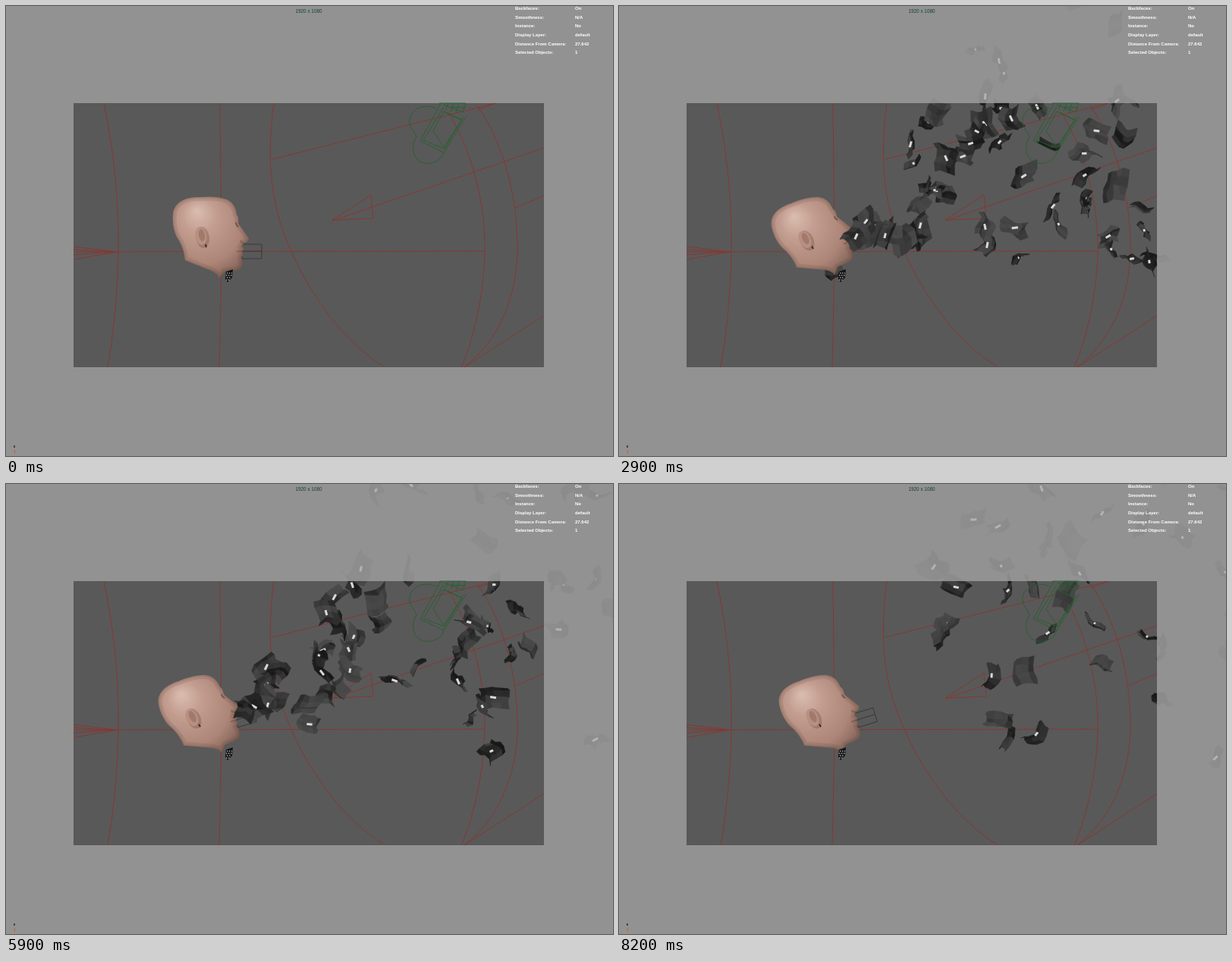
Write an HTML page with a canvas that moves like this. It is 800x593 px and loops after 8.3 s.

```html
<!DOCTYPE html>
<html lang="en">
<head>
<meta charset="utf-8">
<title>Head emitter playblast</title>
<style>
  html, body { margin: 0; width: 100%; height: 100%; overflow: hidden; background: #929292; }
  svg, canvas { position: absolute; left: 0; top: 0; width: 800px; height: 593px; }
  .wire { fill: none; stroke-width: .8; }
  text { font-family: "Liberation Sans", Arial, sans-serif; }
  .hud { font-size: 6px; font-weight: bold; fill: #fff; }
</style>
</head>
<body>
<svg viewBox="0 0 800 593">
  <rect x="89" y="128" width="620" height="348" fill="#595959"/>
  <g class="wire" stroke="#913029">
    <path d="M89 324L631 323M129 128C142 190 149 255 148 323C147 380 142 430 134 476"/>
    <path d="M282 128Q283 220 284 323Q283 400 281 476"/>
    <path d="M353 128C342 210 351 270 376 323C400 380 448 446 500 476"/>
    <path d="M351 202L645 128M430 283L709 187M430 282L481 249L484 280Z"/>
    <path d="M583 140C617 197 632 265 631 323C630 380 616 440 600 476"/>
    <path d="M621 131C655 180 675 250 674 325C672 385 650 440 604 476"/>
    <path d="M671 266L709 250M604 476L709 408M622 137L645 128"/>
    <path d="M89 317L146 324L89 334M89 321L140 324L89 328"/>
  </g>
</svg>
<canvas id="stage" width="800" height="593"></canvas>
<svg viewBox="0 0 800 593">
  <g class="wire" stroke="#1e6329">
    <path d="M567 135C552 127 530 136 532 154C533 162 540 167 541 173C534 183 535 199 546 205C558 211 574 205 577 193"/>
    <path d="M573 128L546 178L577 193L607 145M577 133L550 177L578 188L603 146"/>
    <path d="M577 139L563 165L577 186L601 150ZM577 139L600 150M571 128H606L602 140L577 130"/>
    <path d="M583 128L579 137M590 128L586 139M597 128L593 141M586 133L605 134"/>
  </g>
  <path d="M290 350L299 347L298 358L292 364L289 360Z" fill="#151515"/>
  <path d="M291 352H298M290 355H298M291 358H297M290 361H295" stroke="#e4e4e4" stroke-dasharray="1.5 1.5"/>
  <text x="399" y="9" text-anchor="middle" font-size="6.4" fill="#17452a">1920 x 1080</text>
  <g class="hud" id="hud"></g>
  <path d="M10 579h2v3h-2z" fill="#2c5548"/>
  <path d="M11.5 585V590" stroke="#b06a3c"/>
</svg>
<script>
const LOOP = 8300, STEP = 100;
const MOUTH = { x: 308, y: 306 };
const VIEW = [89, 128, 620, 348];
const ctx = document.getElementById('stage').getContext('2d');

document.getElementById('hud').innerHTML = [
  ['Backfaces:', 'On'], ['Smoothness:', 'N/A'], ['Instance:', 'No'],
  ['Display Layer:', 'default'], ['Distance From Camera:', '27.642'], ['Selected Objects:', '1']
].map(([label, value], i) => {
  const y = 4.8 + i * 11.7;
  return `<text x="671" y="${y}">${label}</text><text x="750" y="${y}">${value}</text>`;
}).join('');

let seed = 71;
function rand(a = 0, b = 1) {
  seed = (seed * 1664525 + 1013904223) >>> 0;
  return a + (b - a) * seed / 4294967296;
}

function ease(t, from, to) {
  const k = Math.min(1, Math.max(0, (t - from) / (to - from)));
  return k * k * (3 - 2 * k);
}

// Tip back, recoil while emitting, then recover
function poseAt(t) {
  const tip = ease(t, 400, 1100);
  return {
    x: 258 + 3 * tip - 15 * ease(t, 1500, 2600) + 10 * ease(t, 7000, 8200),
    y: 303 + 4.5 * tip,
    tilt: -17 * tip
  };
}

// Pieces fly straight from the mouth and slow down a little with age
const reach = age => 215 * Math.pow(age, 0.9);
const CELLS = 4;

function makePiece(birth) {
  const w = rand(12, 20), h = rand(9, 16), p = rand(0, 6), q = rand(0, 6);
  const mesh = [];
  for (let j = 0; j <= CELLS; j++) {
    for (let i = 0; i <= CELLS; i++) {
      const u = i / CELLS * 2 - 1, v = j / CELLS * 2 - 1;
      mesh.push([
        u * w + rand(-2, 2) + 3 * Math.sin(v * 2 + q),
        v * h + rand(-2, 2) + 3 * Math.sin(u * 2.5 + p),
        4 * Math.sin(u * 2.4 + p) + 3 * Math.cos(v * 3 + q)
      ]);
    }
  }
  return {
    birth, mesh,
    angle: rand(-62, 8) * Math.PI / 180,
    speed: rand(0.9, 1.1),
    tick: rand() < 0.7,
    turn: [rand(-0.9, 0.9), rand(-0.9, 0.9), rand(-3, 3)],
    spin: [rand(-1.3, 1.3), rand(-1.3, 1.3), rand(-2, 2)]
  };
}

// The stream thins out as it runs
const pieces = [];
for (let birth = 780; birth < 7500; birth += 28 + birth / 250) pieces.push(makePiece(birth));
const drip = makePiece(0);

function rotate([x, y, z], [a, b, c]) {
  let s = Math.sin(a), k = Math.cos(a);
  [y, z] = [y * k - z * s, y * s + z * k];
  s = Math.sin(b); k = Math.cos(b);
  [x, z] = [x * k + z * s, z * k - x * s];
  s = Math.sin(c); k = Math.cos(c);
  return [x * k - y * s, x * s + y * k, z];
}

function drawCloth(piece, x, y, age) {
  const turn = piece.turn.map((v, i) => v + piece.spin[i] * age);
  const pts = piece.mesh.map(m => rotate(m, turn));
  ctx.lineWidth = 0.7;
  for (let j = 0; j < CELLS; j++) {
    for (let i = 0; i < CELLS; i++) {
      const n = j * (CELLS + 1) + i;
      const quad = [pts[n], pts[n + 1], pts[n + CELLS + 2], pts[n + CELLS + 1]];
      const [a, b, c, d] = quad;
      const e = c.map((v, m) => v - a[m]), f = d.map((v, m) => v - b[m]);
      const nx = e[1] * f[2] - e[2] * f[1];
      const ny = e[2] * f[0] - e[0] * f[2];
      const nz = e[0] * f[1] - e[1] * f[0];
      const light = Math.abs(nx * 0.3 - ny * 0.45 + nz * 0.84) / (Math.hypot(nx, ny, nz) || 1);
      const g = Math.round(24 + 50 * light);
      ctx.fillStyle = ctx.strokeStyle = `rgb(${g},${g},${g})`;
      ctx.beginPath();
      for (const pt of quad) ctx.lineTo(x + pt[0], y + pt[1]);
      ctx.closePath();
      ctx.fill();
      ctx.stroke();
    }
  }
  return rotate([4, -1, 0], turn);
}

function drawTick({ x, y, dir }) {
  ctx.strokeStyle = '#d9d9d9';
  ctx.lineWidth = 3;
  ctx.beginPath();
  ctx.moveTo(x - dir[0], y - dir[1]);
  ctx.lineTo(x + dir[0], y + dir[1]);
  ctx.stroke();
}

function inView(x, y) {
  const [l, t, w, h] = VIEW;
  return x > l && x < l + w && y > t && y < t + h;
}

function drawPieces(t) {
  const outside = [];
  for (const p of pieces) {
    const age = (t - p.birth) / 1000;
    if (age <= 0) continue;
    const r = reach(age) * p.speed;
    const x = MOUTH.x + r * Math.cos(p.angle), y = MOUTH.y + r * Math.sin(p.angle);
    if (x > 830 || y < -30) continue;
    const tick = { x, y, dir: drawCloth(p, x, y, age) };
    if (!p.tick) continue;
    if (inView(x, y)) drawTick(tick);
    else outside.push(tick);
  }
  // Film gate veils everything beyond the frame
  ctx.fillStyle = 'rgba(146,146,146,.94)';
  ctx.beginPath();
  ctx.rect(0, 0, 800, 593);
  ctx.rect(...VIEW);
  ctx.fill('evenodd');
  ctx.globalAlpha = 0.5;
  outside.forEach(drawTick);
  ctx.globalAlpha = 1;
}

const skull = new Path2D(`M236 335C235 323 231 313 225 304C221 296 219 284 220 274
  C222 259 235 252 254 252C266 251 281 251 291 255C300 259 303 267 304 275
  C308 280 305 284 307 288L320 306Q320 311 313 313L311 317Q315 320 311 324Q314 327 310 331
  Q313 340 310 345Q306 349 296 349L288 350Q285 354 281 359Q279 353 271 349Z`);
const skin = ctx.createRadialGradient(252, 270, 2, 260, 294, 72);
[[0, '#d8bbae'], [0.3, '#c29d90'], [0.72, '#ad8678'], [1, '#806257']]
  .forEach(stop => skin.addColorStop(...stop));

function ellipse(x, y, rx, ry, fill) {
  ctx.fillStyle = fill;
  ctx.beginPath();
  ctx.ellipse(x, y, rx, ry, -0.15, 0, 7);
  ctx.fill();
}

function line(d, color, width) {
  ctx.strokeStyle = color;
  ctx.lineWidth = width;
  ctx.stroke(new Path2D(d));
}

function drawHead(t) {
  const { x, y, tilt } = poseAt(t);
  ctx.save();
  ctx.translate(x, y);
  ctx.rotate(tilt * Math.PI / 180);
  ctx.translate(-258, -303);
  line('M311 314H337V333H311ZM311 323H337', '#343434', 0.8);
  ctx.fillStyle = skin;
  ctx.fill(skull);
  ctx.clip(skull);
  for (const w of [10, 4]) {
    ctx.strokeStyle = 'rgba(76,48,40,.12)';
    ctx.lineWidth = w;
    ctx.stroke(skull);
  }
  ellipse(259, 305, 9, 14, 'rgba(100,65,54,.3)');
  ellipse(257, 303, 7.5, 12, '#b88f81');
  ellipse(258, 302, 4, 8, '#a27a6c');
  line('M263 314L264 318', '#352923', 1.8);
  line('M303 285Q303 289 306 291', 'rgba(70,46,38,.7)', 1.2);
  line('M309 309Q311 314 316 312', 'rgba(95,60,49,.5)', 1.2);
  line('M304 323H312', 'rgba(88,56,48,.5)', 1);
  ctx.restore();
}

function draw(t) {
  ctx.clearRect(0, 0, 800, 593);
  if (t >= 1200 && t < 4800) drawCloth(drip, 283, 346, 0);
  drawHead(t);
  drawPieces(t);
}

const start = performance.now();
function tick() {
  const t = (performance.now() - start) % LOOP;
  draw(Math.floor(t / STEP) * STEP);
  requestAnimationFrame(tick);
}
tick();
</script>
</body>
</html>
```
